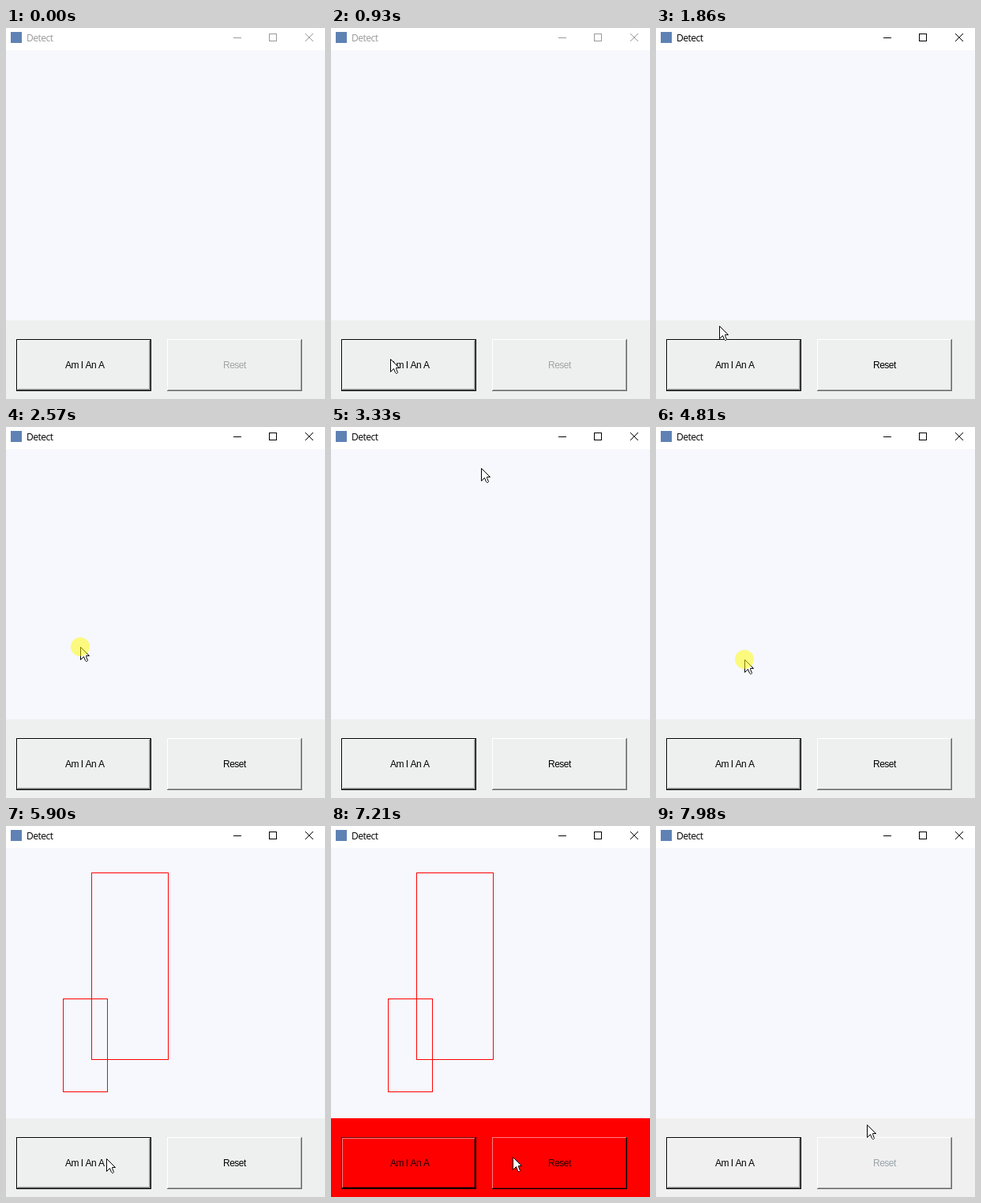
These frames come from a looping animation (404 by 471 pixels, 8 s). An HTML page with a canvas:

```html
<!DOCTYPE html>
<html lang="en">
<head>
<meta charset="utf-8">
<title>Detect</title>
<style>
html, body { margin: 0; width: 100%; height: 100%; overflow: hidden; background: #fff; }
canvas { display: block; }
</style>
</head>
<body>
<canvas id="stage" width="404" height="471"></canvas>
<script>
const ctx = document.getElementById('stage').getContext('2d');
ctx.letterSpacing = '-0.5px';

const LOOP = 8000;
const STEP = 76; // the pointer moves in ticks of this length
const ACTIVATE = 1100, READY = 1320, CHECK = 5420, CHECKED = 5570;
const BOXES = 5900, ALARM = 6200, CLEAR = 7590, CLEARED = 7740;

// One gesture: start, end, and points passed at equal intervals
const move = (start, end, ...points) => ({ start, end, points });
const moves = [
  move(630, 930, [119, 458], [75, 420]),
  move(1780, 2240, [75, 405], [91, 324], [76, 343]),
  move(2420, 3180, [78, 335], [105, 242], [156, 170], [186, 42]),
  move(3260, 3410, [190, 52], [201, 60]),
  move(3640, 3868, [201, 60], [152, 187]),
  move(4035, 4430, [159, 104], [176, 80]),
  move(4510, 4810, [176, 92], [112, 295]),
  move(4960, 5343, [112, 310], [127, 422]),
  move(6350, 6580, [128, 420], [131, 419]),
  move(6750, 7510, [140, 421], [229, 418], [236, 430]),
  move(7668, 7980, [236, 430], [267, 379])
];

// Two clicks on the left button, three drags, one click on Reset
const holds = [
  [ACTIVATE, READY], [CHECK, CHECKED],
  [2240, 3180], [3640, 3950], [4510, 4960],
  [CLEAR, CLEARED]
];

const within = (t, a, b) => t >= a && t < b;

function pointerAt(t) {
  const { start, end, points } = moves.filter(m => m.start <= t).pop();
  const ticks = Math.floor((t - start + 4) / STEP);
  const u = t >= end ? 1 : Math.min(1, ticks * STEP / (end - start));
  const pos = u * (points.length - 1);
  const i = Math.min(points.length - 2, Math.floor(pos));
  return points[i].map((a, k) => Math.round(a + (points[i + 1][k] - a) * (pos - i)));
}

function fill(color, x, y, w, h) {
  ctx.fillStyle = color;
  ctx.fillRect(x, y, w, h);
}

function frame(color, x, y, w, h) {
  ctx.strokeStyle = color;
  ctx.lineWidth = 1;
  ctx.strokeRect(x + 0.5, y + 0.5, w - 1, h - 1);
}

function bevel(x, y, w, h, light, dark) {
  fill(light, x, y, w, 1);
  fill(light, x, y, 1, h);
  fill(dark, x, y + h - 1, w, 1);
  fill(dark, x + w - 1, y, 1, h);
}

function label(text, x, y, color, font) {
  ctx.font = font;
  ctx.fillStyle = color;
  ctx.fillText(text, x, y);
}

function button(x, text, textX, { focus, pressed, red, color }) {
  const y = 395, w = 171, h = 66, d = focus ? 1 : 0;
  const light = red ? '#ff8080' : '#fff';
  const dark = red ? '#000' : '#696969';
  const mid = red ? '#a00000' : '#a0a0a0';
  if (focus) bevel(x, y, w, h, red ? '#700000' : '#000', '#000');
  if (pressed) {
    frame(mid, x + d, y + d, w - 2 * d, h - 2 * d);
  } else {
    bevel(x + d, y + d, w - 2 * d, h - 2 * d, light, dark);
    fill(mid, x + d + 1, y + h - d - 2, w - 2 * d - 2, 1);
    fill(mid, x + w - d - 2, y + d + 1, 1, h - 2 * d - 2);
  }
  const shift = pressed ? 1 : 0;
  label(text, textX + shift, 432 + shift, color, '12px "Liberation Sans", sans-serif');
}

function titleBar(active) {
  const ink = active ? '#000' : '#999';
  fill('#fff', 0, 0, 404, 28);
  fill('#5f82b4', 6, 5, 14, 14);
  label('Detect', 26, 17, ink, '12px "Open Sans", sans-serif');
  fill(ink, 288, 12, 10, 1);
  frame(ink, 333, 7, 10, 10);
  ctx.beginPath();
  ctx.moveTo(379, 7);
  ctx.lineTo(389, 17);
  ctx.moveTo(389, 7);
  ctx.lineTo(379, 17);
  ctx.stroke();
}

function pointer(x, y, held) {
  ctx.save();
  ctx.translate(x + 0.5, y + 0.5);
  ctx.beginPath();
  [[0, 0], [0, 16], [4, 12], [6, 17], [7, 18], [8, 18], [9, 17], [7, 12], [7, 11], [11, 11]]
    .forEach(p => ctx.lineTo(...p));
  ctx.closePath();
  ctx.fillStyle = '#fff';
  ctx.fill();
  ctx.strokeStyle = '#000';
  ctx.lineWidth = 1;
  ctx.stroke();
  ctx.restore();
  if (held) {
    ctx.fillStyle = 'rgba(255, 252, 0, 0.5)';
    ctx.beginPath();
    ctx.arc(x, y, 12, 0, 2 * Math.PI);
    ctx.fill();
  }
}

function draw(t) {
  const red = within(t, ALARM, CLEARED);
  const cleared = t >= CLEARED;
  const enabled = within(t, READY, CLEARED);
  const ink = red ? '#200000' : '#000';
  const grey = cleared ? '#9aa4ab' : '#a3a3a3';

  titleBar(t >= ACTIVATE);
  fill('#f7f8fd', 0, 28, 404, 343);
  fill(red ? '#f00' : cleared ? '#f0f0f0' : '#eef0f0', 0, 371, 404, 100);

  button(13, 'Am I An A', 75, {
    focus: true, red, color: ink,
    pressed: within(t, ACTIVATE, READY) || within(t, CHECK, CHECKED)
  });
  button(204, 'Reset', 275, {
    red, color: enabled ? ink : grey, pressed: within(t, CLEAR, CLEARED)
  });

  if (within(t, BOXES, CLEARED)) {
    frame('#f00', 108, 59, 98, 238);
    frame('#f00', 72, 219, 57, 119);
  }
  if (t >= moves[0].start) {
    const [x, y] = pointerAt(t);
    pointer(x, y, holds.some(([a, b]) => within(t, a, b)));
  }
}

function tick() {
  draw(performance.now() % LOOP);
  requestAnimationFrame(tick);
}
tick();
</script>
</body>
</html>
```
